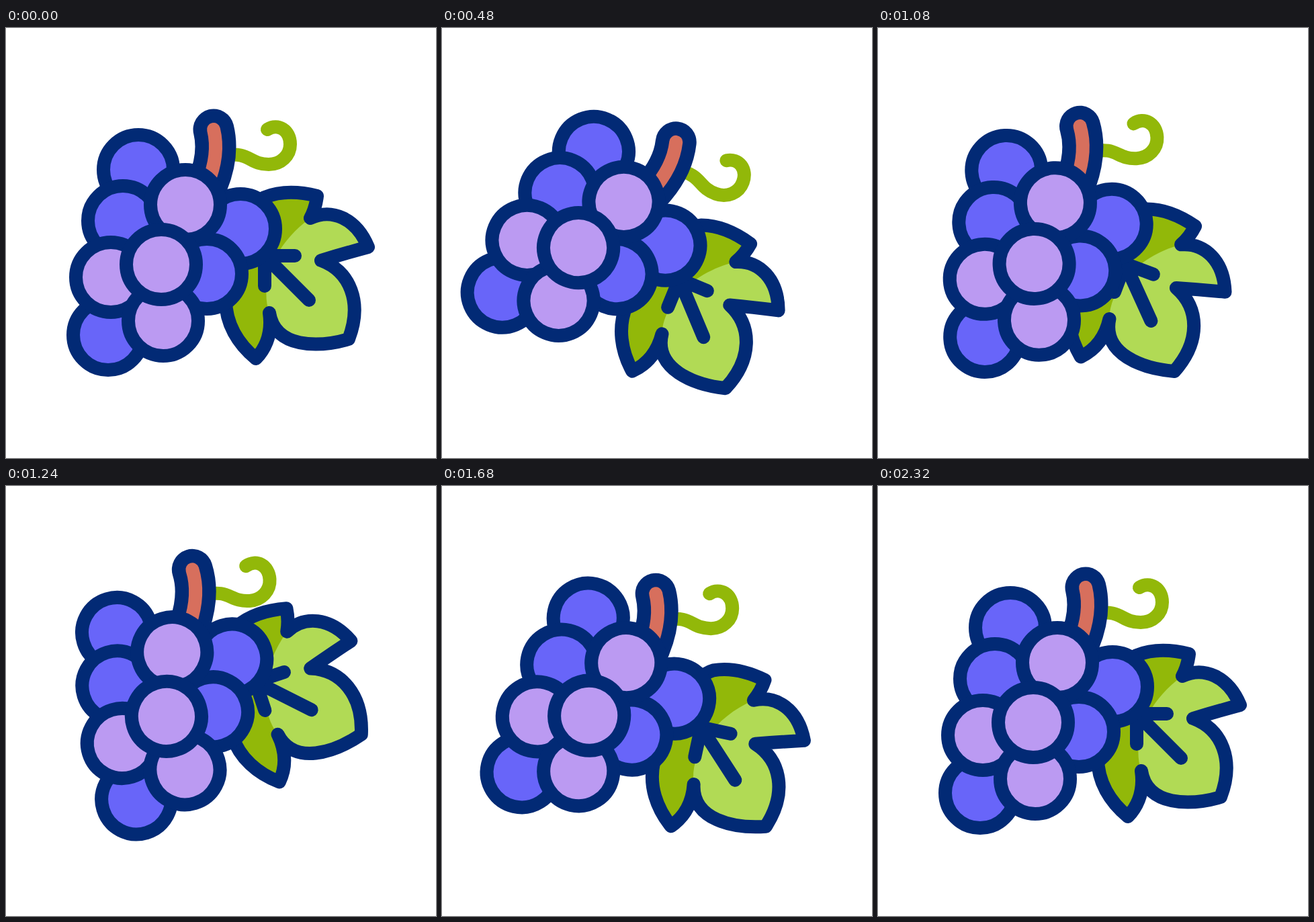
Animation of 640 by 640 pixels, one loop 2.44 s. Source, as an HTML page:

```html
<!DOCTYPE html>
<html>
<head>
<meta charset="utf-8">
<style>
html, body { margin: 0; width: 100%; height: 100%; overflow: hidden; background: #fff; }
svg { display: block; width: 100%; height: 100%; }
.line { fill: none; stroke: #022a75; stroke-width: 20; stroke-linecap: round; stroke-linejoin: round; }
</style>
</head>
<body>
<svg viewBox="0 0 640 640">
  <g id="bunch">
    <g id="leaf">
      <path id="blade" fill="#92b809"/>
      <path id="light" fill="#b1da55"/>
      <path id="edge" class="line"/>
      <path class="line" d="M430 339H385V384M385 339L451 405"/>
    </g>
    <path class="line" style="stroke:#92b809" d="M325 190C362 183 362 203 391 203C409 203 423 190 423 173C423 152 405 141 389 151"/>
    <path class="line" style="stroke-width:61" d="M309 151Q318 188 300 232"/>
    <path class="line" style="stroke:#d76f5d" d="M309 151Q318 188 300 232"/>
    <g id="grapes"></g>
  </g>
</svg>
<script>
const $ = id => document.getElementById(id);

// Leaf: the lobes run clockwise from the upper notch to the lower one.
const lobes = "C485 268 521 283 539 326Q502 336 469 346C512 362 531 408 510 463C465 476 400 477 392 424";
const outline = "M385 252C410 242 435 243 463 250Q461 268 453 283" + lobes +
  "C396 452 388 475 372 492C345 470 327 440 327 405C327 360 350 270 385 252Z";
$("blade").setAttribute("d", outline);
$("edge").setAttribute("d", outline);
$("light").setAttribute("d", "M453 283" + lobes + "C378 385 395 325 453 283Z");

const dark = "#6865f9", pale = "#bb9af2";
const berries = [
  [197, 211, dark], [174, 287, dark], [152, 457, dark], [349, 299, dark], [299, 366, dark],
  [267, 263, pale], [156, 371, pale], [234, 436, pale], [231, 352, pale]
];
$("grapes").innerHTML = berries.map(([x, y, fill]) =>
  `<circle class="line" cx="${x}" cy="${y}" r="52" style="fill:${fill}"/>`).join("");

// Turning points [time, value] of each damped swing; the leaf trails the grapes.
const swings = {
  shift: [[200, 0], [820, 28], [1290, -28], [1720, 10], [2320, 0]],
  stem: [[200, 0], [660, 30], [1140, -4], [1700, 0]],
  grapes: [[200, 0], [690, 37], [1290, -18], [1820, 19], [2068, 0]],
  leaf: [[200, 0], [820, 52.5], [890, 52.5], [1315, -24], [1810, 19], [2110, 0]]
};

// Sine easing from one turning point to the next
function swing(points, t) {
  const next = points.findIndex(p => p[0] > t);
  if (next === 0) return points[0][1];
  if (next < 0) return points[points.length - 1][1];
  const [t0, from] = points[next - 1], [t1, to] = points[next];
  const ease = (1 - Math.cos(Math.PI * (t - t0) / (t1 - t0))) / 2;
  return from + (to - from) * ease;
}

const STEP = 40, LOOP = 2440;

function draw(now) {
  const t = Math.floor(now % LOOP / STEP) * STEP;
  const at = name => swing(swings[name], t);
  const shift = at("shift"), stem = at("stem");
  $("bunch").setAttribute("transform", `translate(${shift} ${shift}) rotate(${stem} 303 232)`);
  $("grapes").setAttribute("transform", `rotate(${at("grapes") - stem} 306 250)`);
  $("leaf").setAttribute("transform", `rotate(${at("leaf") - stem} 328 304)`);
}

const start = performance.now();
function tick() {
  draw(performance.now() - start);
  requestAnimationFrame(tick);
}
tick();
</script>
</body>
</html>
```
